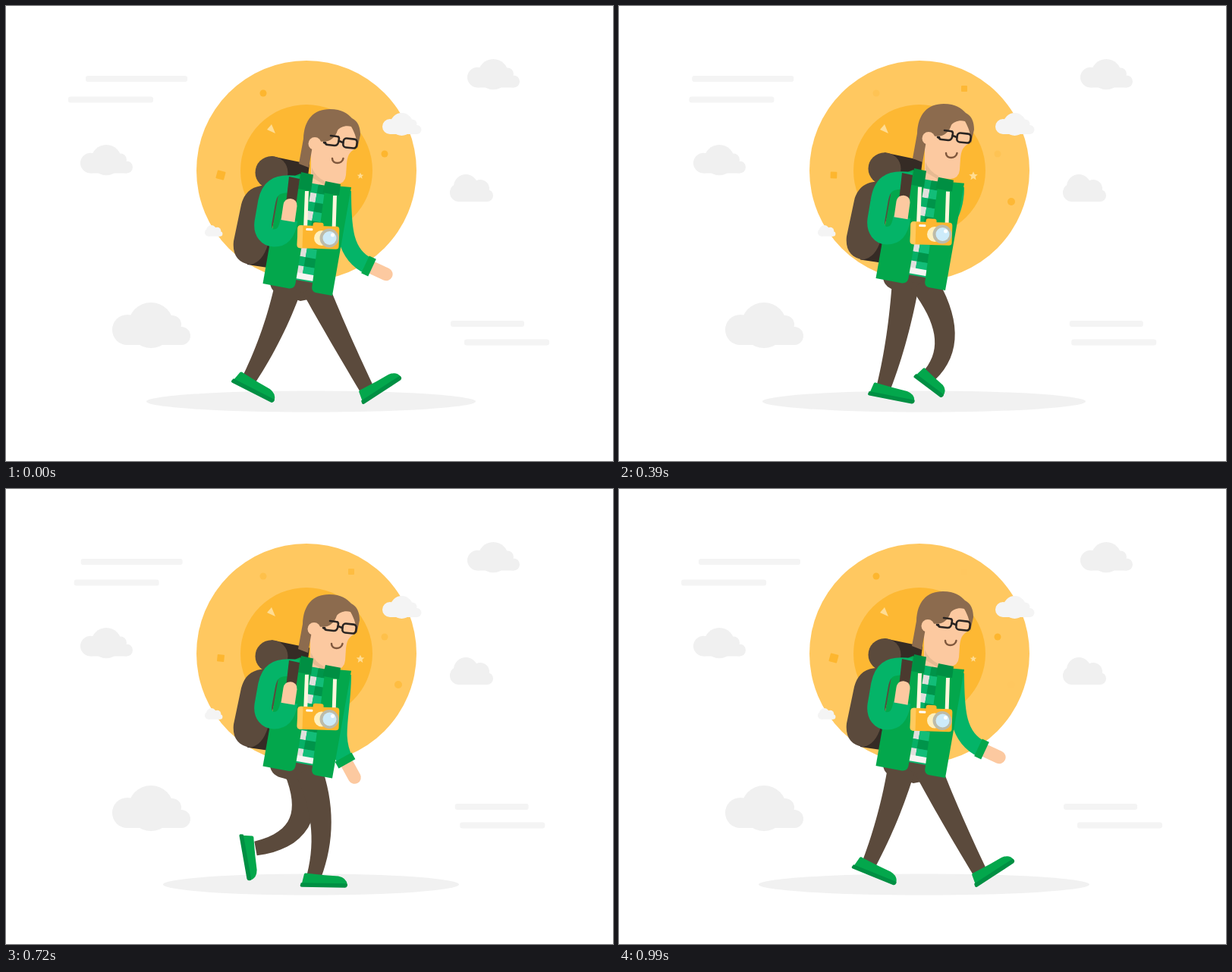
These frames come from a looping animation (800 by 600 pixels, 1020 ms). An HTML page:

```html
<!DOCTYPE html>
<html lang="en">
<head>
<meta charset="utf-8">
<title>Hiker</title>
<style>
  html, body { margin: 0; width: 100%; height: 100%; overflow: hidden; background: #fff; }
  svg { display: block; width: 100vw; height: 100vh; }
  .jacket { fill: #03a74c; }
  .sleeve { fill: #04b468; }
  .collar { fill: #008f43; }
  .brown { fill: #5b4a3c; }
  .dark { fill: #352b25; }
  .skin { fill: #fcc9a0; }
  .hair { fill: #8c6b4e; }
  .spark { fill: #fdb62f; }
  .pale { fill: #ffdc92; }
  .line { fill: none; stroke-linecap: round; stroke-linejoin: round; }
</style>
</head>
<body>
<svg viewBox="0 0 800 600">
  <defs>
    <g id="cloud">
      <circle cx="20" cy="36" r="20"/><circle cx="51" cy="30" r="30"/>
      <circle cx="79" cy="29" r="12"/><circle cx="91" cy="44" r="12"/>
      <path d="M20 30H88L92 56H20Z"/>
    </g>
    <g id="puff">
      <circle cx="12" cy="24" r="12"/><circle cx="21" cy="16" r="16"/>
      <circle cx="40" cy="19" r="12"/><circle cx="49" cy="28" r="8"/>
      <path d="M12 18H48L49 36H12Z"/>
    </g>
    <g id="foot">
      <path class="jacket" d="M-16 15L-13 2Q-12 0 -9 1L14 3L32 4Q43 6 44 15Z"/>
      <path class="collar" d="M-17 13.500H43Q45 14 44 17Q43 19 41 19H-16Q-18 19 -18 17Z"/>
    </g>
  </defs>

  <circle cx="396" cy="217" r="145" fill="#ffc860"/>
  <circle cx="396" cy="217" r="87" fill="#fdb833"/>
  <path class="pale" d="M344 163L350 156L355 168Z"/>
  <path id="star" class="pale" d="M0-6L1.800-2L6-1.800L2.700 1L3.700 5.500L0 3L-3.700 5.500L-2.700 1L-6-1.800L-1.800-2Z"/>
  <rect id="tile" class="spark" x="-5.500" y="-5.500" width="11" height="11" rx="1"/>
  <g id="sparksA" class="spark"><circle cx="339" cy="115" r="4.500"/><circle cx="499" cy="195" r="4.500"/></g>
  <g id="sparksB" class="spark"><rect x="451" y="105" width="8" height="8" rx="1"/><circle cx="517" cy="258" r="5"/></g>

  <g fill="#f0f0f0">
    <use href="#cloud" transform="translate(608 70) scale(.67)"/>
    <use href="#cloud" transform="translate(98 183) scale(.67)"/>
    <use href="#cloud" transform="translate(140 391)"/>
    <use href="#puff" transform="translate(585 222)"/>
  </g>
  <g fill="#f4f4f4">
    <use href="#cloud" transform="translate(496 141) scale(.5)"/>
    <use href="#puff" transform="translate(262 289) scale(.41)"/>
    <g id="wind">
      <rect y="92" width="134" height="8" rx="3"/>
      <rect y="119.500" width="112" height="8" rx="3"/>
      <rect y="415" width="97" height="8" rx="3"/>
      <rect y="439.500" width="112" height="8" rx="3"/>
    </g>
  </g>
  <ellipse id="shadow" cx="402" cy="521.500" ry="14" fill="#f1f1f1"/>

  <path id="arm" class="line" stroke="#04b468" stroke-width="22" style="stroke-linecap:butt"/>
  <g id="cuff">
    <rect class="skin" x="-2" y="-8.500" width="36" height="17" rx="8.500"/>
    <rect class="jacket" x="-5" y="-12.500" width="10" height="25"/>
  </g>

  <g class="body">
    <path class="dark" d="M318 300L362 300L345 345L318 341Z"/>
    <path class="brown" d="M347 237C325 235 314 246 310 262L300 310C298 328 306 339 322 341Q338 338 345 315L366 237Z"/>
    <path class="dark" d="M350 198L400 208.500L396 240H350Z"/>
    <circle class="brown" cx="350" cy="219.500" r="21.500"/>
  </g>

  <path id="pelvis" class="brown" d="M347 355H418L419 383L388 389L366 382Q350 379 348 366Z"/>
  <path class="leg brown"/><use class="shoe" href="#foot"/>
  <path class="leg brown"/><use class="shoe" href="#foot"/>

  <g id="head">
    <path class="skin" d="M402 180V245H420V234L436 235Q447 234 448 223L449 208C450 198 452 193 459 189L464 172L450 152L420 160Z"/>
    <path d="M403 213Q408 225 420 231V236L403 226Z" fill="#e6ba92"/>
    <path class="hair" d="M386 208L392 175C393 150 405 136 427 136C443 136 450 142 456 148C464 152 467 160 467 170L463 188C463 176 460 168 455 159C447 157 440 160 437 164C433 176 424 181 412 178L404 185L399 213Z"/>
    <circle class="skin" cx="407" cy="181.500" r="8.500"/>
    <g class="line" stroke="#2a2522" stroke-width="2.600">
      <path d="M421 180Q421 183 424 183L433 184Q437 184 438 180L439 175Q439 172 436 172L428 171M439 178L444 180M419 180L421 181"/>
      <rect x="444.500" y="175" width="18" height="12" rx="4" transform="rotate(6 453 181)"/>
    </g>
    <path class="line" stroke="#80583d" stroke-width="2.500" d="M430 201C430 209 443 209 444.500 201"/>
  </g>

  <g class="body">
    <g id="shirt" transform="translate(398 238) rotate(10)"></g>
    <path class="jacket" d="M388 221L362 231L338.500 366L373 372.500Q380 373 381.500 366L402 242Z"/>
    <path class="jacket" d="M421 236L455 239L430 382L408 378Q402 376 403.500 369Z"/>
    <path class="collar" d="M389 219L405 222.500L402 244L385 241Z"/>
    <path class="collar" d="M421 231L441 235L439 250L417.500 246Z"/>
    <path class="line" stroke="#fff6dc" stroke-width="5" d="M396.500 244L394.500 295M433.500 250L432 296" style="stroke-linecap:butt"/>
  </g>

  <g id="nearArm">
    <path class="line" stroke="#04b468" stroke-width="23" style="stroke-linecap:butt" d="M385 236C354 231 346 242 343 262L339 285C337 299 345 306 353 306C366 306 371 296 373 282"/>
    <path d="M373 225L387 228L382 263L369 261Z" fill="#4b3a2f"/>
    <path class="skin" d="M362.500 282L365.500 262Q367 254 375 254Q384 255 383.500 264L380.500 285Z"/>
  </g>

  <g id="camera">
    <g transform="rotate(2 411 305)">
      <rect class="spark" x="404" y="285.500" width="14" height="9" rx="3"/>
      <rect class="spark" x="384" y="290" width="55" height="30" rx="4"/>
      <path d="M391 290H388Q384 290 384 294V316Q384 320 388 320H391Z" fill="#ffca5e"/>
      <rect x="395" y="293.500" width="9" height="3" rx="1" fill="#fff"/>
    </g>
    <circle cx="416" cy="306" r="10" fill="#fff0bd"/>
    <circle cx="426" cy="306" r="12.500" fill="#bdbba9"/>
    <circle cx="426.500" cy="306" r="9" fill="#cdebfa"/>
    <circle cx="430.500" cy="302" r="2.500" fill="#fff"/>
  </g>
</svg>
<script>
const LOOP = 1020, STEP = LOOP / 2, FRAME = 30;
const $ = id => document.getElementById(id);
const all = q => [...document.querySelectorAll(q)];

// time, hip x, mid x, mid y, ankle x, ankle y, foot angle, foot length
const legKeys = [
  [0, 407, 438, 433, 475, 500, -33, 1],
  [90, 408, 443, 437, 447, 502, -8, 1],
  [150, 410, 437, 442, 427, 505, 1, 1],
  [210, 398, 415, 440, 406, 506, 1, 1],
  [390, 378, 366, 436, 349, 498, 11, 1],
  [480, 372, 354, 432, 330, 489, 22, 1],
  [510, 372, 350, 432, 321, 487, 27, 1],
  [600, 377, 363, 442, 316, 478, 38, 1],
  [660, 381, 378, 440, 320, 472, 55, 1],
  [720, 384, 386, 440, 329, 470, 80, 1],
  [900, 400, 429, 432, 410, 482, 37, .75],
  [990, 407, 438, 433, 475, 500, -33, 1]
];
// time, collar, hem, head x, head y, camera, elbow, shadow radius
const bobKeys = [
  [0, 0, 0, 0, 0, 0, 0, 217],
  [90, 8, 11.5, -1, 10, 4, 6, 199],
  [150, 8, 10.5, -1, 11, 4, 5, 199],
  [210, 1, -.5, -1, 3, -2.5, -1, 195],
  [390, -5, -7, 1, -7, -5, -3, 213],
  [480, -1, -1, 0, -1, -.5, 0, 218]
];
// time, cuff x, cuff y, angle
const armKeys = [
  [0, 478, 343, 25],
  [150, 462, 359, 45],
  [390, 400, 330, 110],
  [510, 390, 320, 120],
  [600, 400, 330, 110],
  [720, 447, 358, 61],
  [900, 482, 338, 22],
  [990, 478, 343, 25]
];

// smooth periodic curve through the keys
function sample(keys, period, time) {
  const t = time % period, n = keys.length;
  let i = n - 1;
  while (keys[i][0] > t) i--;
  const at = j => {
    const turn = Math.floor(j / n), [t0, ...rest] = keys[j - turn * n];
    return [t0 + turn * period, ...rest];
  };
  const [a, b, c, d] = [i - 1, i, i + 1, i + 2].map(at);
  const span = c[0] - b[0], u = (t - b[0]) / span, u2 = u * u, u3 = u2 * u;
  return b.map((v, j) => {
    const m0 = (c[j] - a[j]) / (c[0] - a[0]) * span;
    const m1 = (d[j] - v) / (d[0] - b[0]) * span;
    return (2 * u3 - 3 * u2 + 1) * v + (u3 - 2 * u2 + u) * m0
      + (3 * u2 - 2 * u3) * c[j] + (u3 - u2) * m1;
  }).slice(1);
}

const move = (el, value) => el.setAttribute('transform', value);

// shifts height y0 by d0 and height y1 by d1
function stretch(y0, d0, y1, d1) {
  const k = 1 + (d1 - d0) / (y1 - y0);
  return `matrix(1 0 0 ${k} 0 ${d0 - y0 * (k - 1)})`;
}

// tapered limb along a quadratic curve that passes through the middle point
function limb(hx, hy, mx, my, ax, ay) {
  const kx = 2 * mx - (hx + ax) / 2, ky = 2 * my - (hy + ay) / 2;
  const left = [], right = [], n = 16;
  for (let i = 0; i <= n; i++) {
    const u = i / n, v = 1 - u;
    const x = v * v * hx + 2 * u * v * kx + u * u * ax;
    const y = v * v * hy + 2 * u * v * ky + u * u * ay;
    const dx = v * (kx - hx) + u * (ax - kx), dy = v * (ky - hy) + u * (ay - ky);
    const w = (18 - 8.5 * u) / Math.hypot(dx, dy);
    left.push([x - dy * w, y + dx * w]);
    right.unshift([x + dy * w, y - dx * w]);
  }
  return 'M' + left.concat(right).join('L') + 'Z';
}

function buildShirt() {
  const rect = (x, y, w, h, fill) =>
    `<rect x="${x}" y="${y}" width="${w}" height="${h}" fill="${fill}"/>`;
  const row = 12.2;
  let out = rect(0, -4, 30, 128, '#0bb56c');
  for (let i = 0; i < 10; i++) {
    const y = -5.2 + i * row, odd = i % 2;
    out += rect(0, y, 13, row, odd ? '#e0dfdc' : '#06b066');
    out += rect(13, y, 17, row, odd ? '#12bd78' : '#00944a');
  }
  $('shirt').innerHTML = out + rect(0, 114, 30, 8, '#f6f5f2');
}

function draw(t) {
  const wave = (1 + Math.cos(2 * Math.PI * t / LOOP)) / 2;
  const [collar, hem, headX, headY, cam, elbow, radius] = sample(bobKeys, STEP, t);

  $('sparksA').setAttribute('opacity', .12 + .88 * wave);
  $('sparksB').setAttribute('opacity', 1 - wave);
  move($('star'), `translate(467 224) scale(${1 - .3 * wave})`);
  move($('tile'), `translate(283 223) rotate(${15 * wave}) scale(${.75 + .25 * wave})`);
  const lines = $('wind').children;
  [[95, 10], [94, -12], [595, -9], [595, 9]].forEach(([x, dx], i) =>
    lines[i].setAttribute('x', x + dx * wave));
  $('shadow').setAttribute('rx', radius);

  all('.body').forEach(el => move(el, stretch(219, collar, 375, hem)));
  move($('pelvis'), `translate(0 ${hem})`);
  move($('head'), `translate(${headX} ${headY})`);
  move($('nearArm'), stretch(223, collar, 318, elbow));
  move($('camera'), `translate(0 ${cam})`);

  const shoes = all('.shoe');
  all('.leg').forEach((leg, i) => {
    const [hx, mx, my, ax, ay, angle, len] = sample(legKeys, LOOP, t + i * STEP);
    leg.setAttribute('d', limb(hx, 370 + hem, mx, my, ax, ay + 4));
    move(shoes[i], `translate(${ax} ${ay}) rotate(${angle}) scale(${len} 1)`);
  });

  const [cx, cy, angle] = sample(armKeys, LOOP, t), a = angle * Math.PI / 180;
  const top = 244 + collar;
  $('arm').setAttribute('d', `M444 ${top}C444 ${top + 50} ${cx - 35 * Math.cos(a)} ${cy - 35 * Math.sin(a)} ${cx} ${cy}`);
  move($('cuff'), `translate(${cx} ${cy}) rotate(${angle})`);
}

const start = performance.now();
function tick() {
  const t = Math.max(0, performance.now() - start);
  draw(Math.floor(t / FRAME) * FRAME % LOOP);
  requestAnimationFrame(tick);
}
buildShirt();
tick();
</script>
</body>
</html>
```
